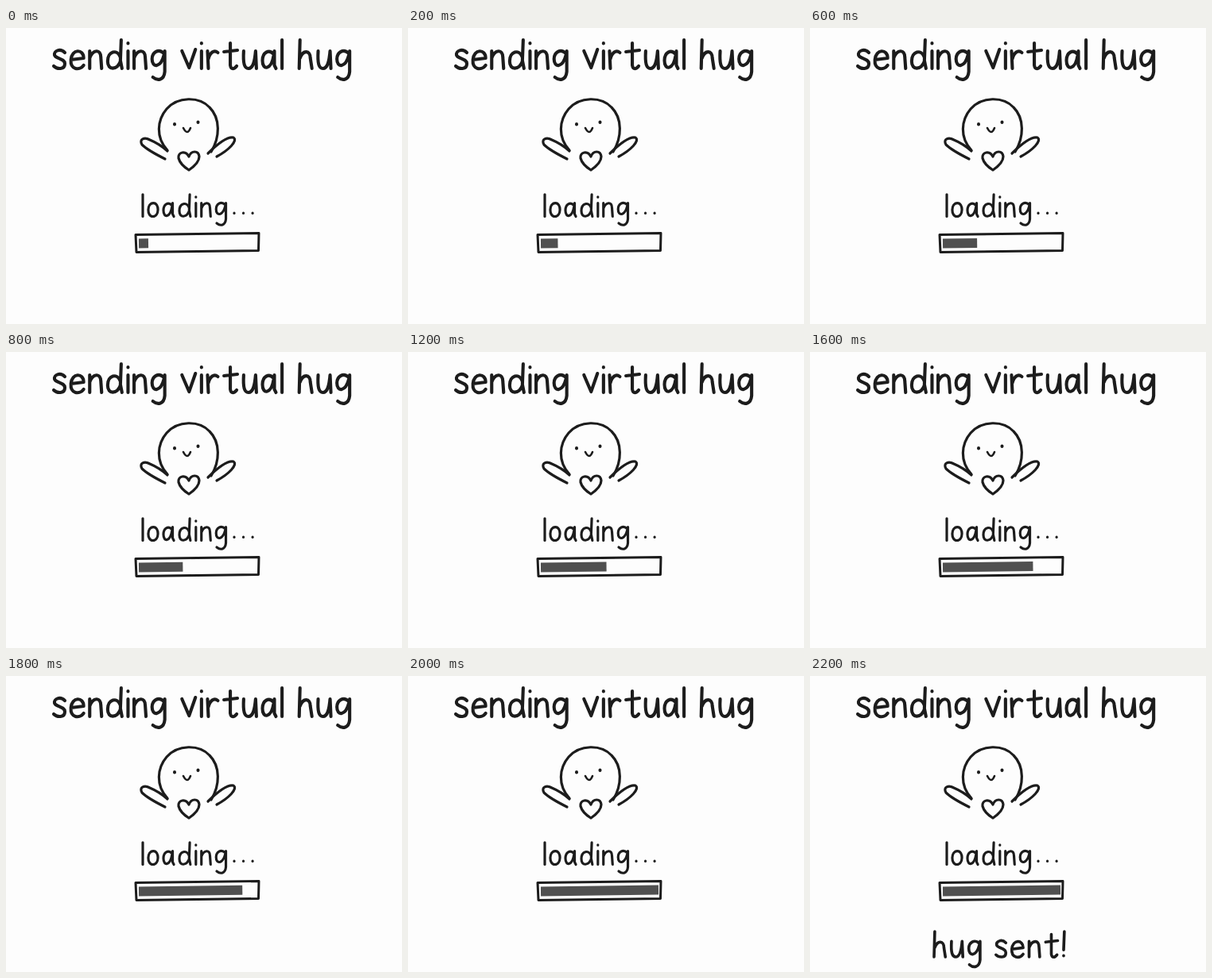
An HTML page that plays this animation: 498x373 px, repeating every 3200 ms.

```html
<!DOCTYPE html>
<html lang="en">
<head>
<meta charset="utf-8">
<title>sending virtual hug</title>
<style>
  html, body { margin: 0; width: 100%; height: 100%; overflow: hidden; background: #fdfdfd; }
  svg { display: block; width: 498px; height: 373px; filter: blur(.75px); }
  path { fill: none; stroke: #1c1c1c; stroke-linecap: round; stroke-linejoin: round; }
  #bar { stroke: #505050; stroke-width: 12px; stroke-linecap: butt; }
</style>
</head>
<body>
<svg viewBox="0 0 498 373">
  <g stroke-width="3.2">
    <path d="M203 154C188 138 190 116 202 102C216 86 243 86 256 100C270 114 269 138 258 156"/>
    <path d="M200 165Q178 154 171 147C167 140 174 137 181 141Q193 146 203 155"/>
    <path d="M254 158Q276 136 286 138C292 142 280 154 265 162"/>
    <path d="M230 162C226 154 216 156 217 164Q219 172 230 179Q243 170 243 162C242 154 233 154 230 162"/>
    <path d="M223 126Q228 136 232 126" stroke-width="2.6"/>
    <path d="M212 121v.5M241.500 118.500v.5" stroke-width="4"/>
  </g>
  <path id="bar"/>
  <path d="M163 260.500L318 258.500L317.500 280.500L164 282.500Z" stroke-width="3"/>
</svg>
<script>
// Hand-lettered strokes with the baseline at y = 0
const glyphs = {
  s: 'M15-20C9-26 1-22 2-17C3-12 15-13 15-6C15 2 5 1 1-3',
  e: 'M1-11L17-13C17-25 2-25 1-11C0 2 12 3 17-4',
  n: 'M1-22L1 0M1-13C5-24 15-25 15-14L16 0',
  d: 'M17-14C13-25 1-22 1-9C1 3 13 2 17-9M18-36L17-10L19 0',
  i: 'M0-22L0 0M0-32v.5',
  g: 'M16-19C9-26 1-20 1-12C1 0 12-1 16-17M17-22L17 4C16 15 8 16 2 11',
  v: 'M0-22L9-1L17-24',
  r: 'M0-22L1 0M1-12C3-20 8-24 13-20',
  t: 'M8-32L8-4C9 2 13 1 16-3M0-21L17-23',
  u: 'M0-22C-1-6 1 0 6 0C12 0 14-10 15-22L16 0',
  a: 'M15-18C9-25 1-20 1-10C1 3 12 2 15-16M16-22L16-4L18 0',
  l: 'M0-36L0 0',
  h: 'M1-36L0 0M1-13C5-24 14-23 14-13L16 0',
  o: 'M9-22C-2-22-2 0 8 0C19 0 19-22 9-22',
  '!': 'M1-36L0-10M0-2v.5',
  '.': 'M0-5v.5'
};
const wordSpace = 14;

const svg = document.querySelector('svg');
const bar = document.getElementById('bar');

function add(parent, tag, attrs) {
  const node = document.createElementNS('http://www.w3.org/2000/svg', tag);
  for (const key in attrs) node.setAttribute(key, attrs[key]);
  return parent.appendChild(node);
}

// Sets each letter after the last one, by its own width plus a gap
function letter(text, left, baseline, scale, gap) {
  const line = add(svg, 'g', {
    role: 'img', 'aria-label': text, 'stroke-width': 4.1,
    transform: `translate(${left} ${baseline}) scale(${scale})`
  });
  let x = 0;
  for (const char of text) {
    if (char === ' ') { x += wordSpace; continue; }
    const stroke = add(line, 'path', { d: glyphs[char] });
    const box = stroke.getBBox();
    stroke.setAttribute('transform', `translate(${x - box.x} 0)`);
    x += box.width + gap;
  }
  return line;
}

letter('sending virtual hug', 60, 51, 1, 7.6);
letter('loading', 172, 237.5, .77, 9);
letter('...', 287, 237, .77, 15);
const sent = letter('hug sent!', 156, 354, .89, 8.4);

function draw(now) {
  const time = now % 3200;
  const step = Math.min(Math.floor(time / 200), 10);
  const end = 179 + 9 * step + .46 * step ** 2;
  bar.setAttribute('d', `M167 271.500L${end} ${271.5 - (end - 167) * .013}`);
  sent.style.visibility = time < 2200 ? 'hidden' : 'visible';
  requestAnimationFrame(draw);
}
draw(performance.now());
</script>
</body>
</html>
```
